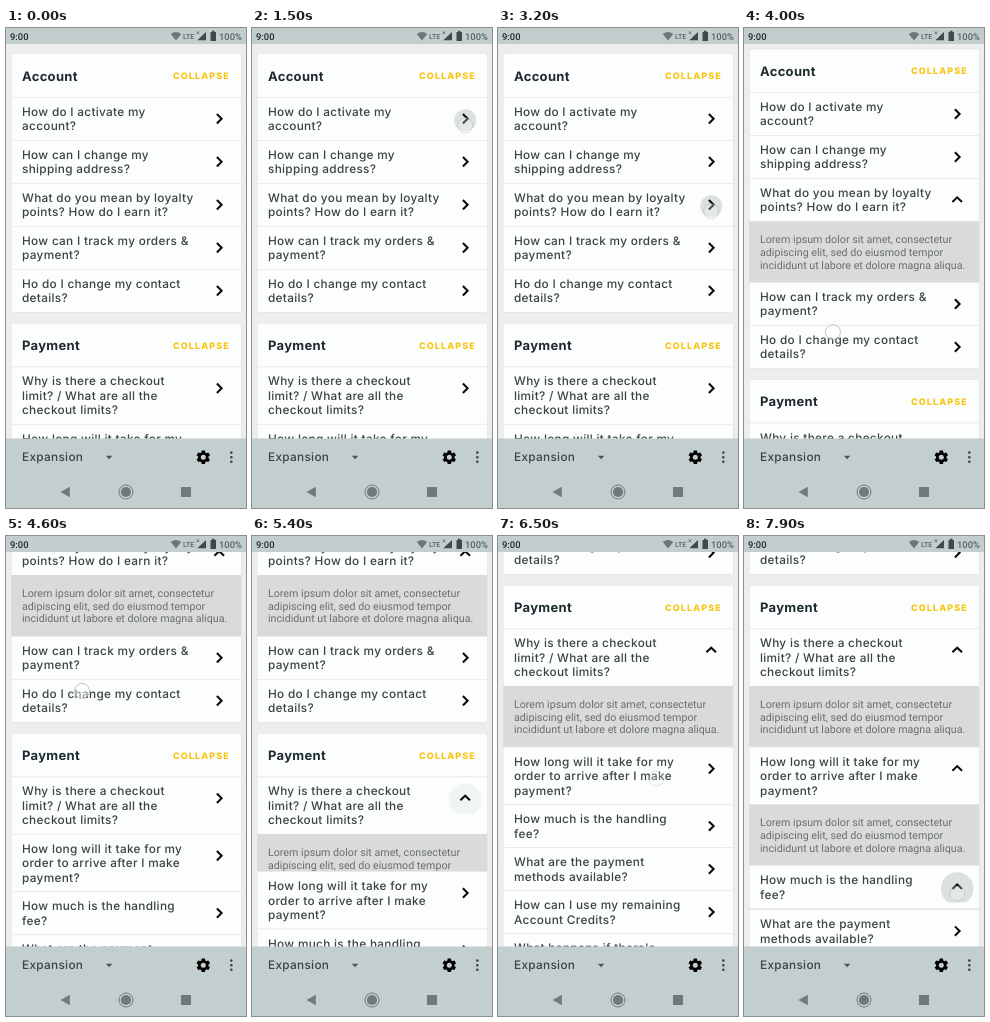
Animation of 240x480 px, one loop 8 s. Source, as an HTML page:

```html
<!DOCTYPE html>
<html lang="en">
<head>
<meta charset="utf-8">
<title>Expansion list</title>
<style>
  html, body { margin: 0; width: 100%; height: 100%; overflow: hidden; background: #ebeeec; }
  svg { display: block; width: 100vw; height: 100vh; }
  text { white-space: pre; text-rendering: geometricPrecision; }
  .title { font: 700 13px Inter, sans-serif; letter-spacing: .3px; fill: #1d2b30; }
  .action { font: 800 9px Inter, sans-serif; letter-spacing: 1.1px; fill: #f8c410; }
  .question { font: 500 11.8px Inter, sans-serif; letter-spacing: .31px; fill: #3a4244; }
  .answer { font: 400 10.7px Roboto, sans-serif; fill: #6a6e6d; }
  .status { font: 500 9.4px Roboto, sans-serif; fill: #566163; }
  .chevron { fill: none; stroke: #0c0e0e; stroke-width: 2.1; }
</style>
</head>
<body>
<svg id="stage" viewBox="0 0 240 480">
  <defs>
    <clipPath id="buttonClip"><rect x="-17" y="-17" width="34" height="32.5"/></clipPath>
  </defs>
  <rect width="240" height="480" fill="#ebeeec"/>
  <g id="list"></g>
  <circle id="finger" r="7.5" fill="#fff" fill-opacity=".45" stroke="#a9adac" stroke-opacity=".7"/>

  <g id="statusBar">
    <rect width="240" height="16" fill="#c2cdce"/>
    <text class="status" x="4" y="12" style="fill:#20282a">9:00</text>
    <path d="M164.8 6Q170 2.2 175.2 6L170 12.6Z" fill="#6b7779"/>
    <text class="status" x="177" y="11" style="font-size:7px">LTE</text>
    <path d="M191.3 12.3L200 4V12.3Z" fill="#3f4a4c"/>
    <path d="M190.6 3.4l2.6 2.8m0-2.8l-2.6 2.8" stroke="#566163" stroke-width=".8"/>
    <path d="M204.5 4h1.5v-1.2h2.5V4h1.5v9h-5.5z" fill="#3f4a4c"/>
    <text class="status" x="213" y="12">100%</text>
  </g>

  <g id="toolbar">
    <rect y="410.5" width="240" height="69.5" fill="#c3cecf"/>
    <text class="question" x="16" y="433.3">Expansion</text>
    <path d="M99.8 427.8h6.6l-3.3 3.5z" fill="#4c5658"/>
    <g id="gear" transform="translate(197.3 429.3)"></g>
    <g fill="#3c4547">
      <circle cx="225.3" cy="424.6" r="1.3"/><circle cx="225.3" cy="429.2" r="1.3"/><circle cx="225.3" cy="433.8" r="1.3"/>
    </g>
    <g fill="#6f7a7b">
      <path d="M54.5 464l9.3-5.3v10.6z"/>
      <circle cx="120" cy="464" r="5.1"/>
      <circle cx="120" cy="464" r="7" fill="none" stroke="#6f7a7b"/>
      <rect x="175" y="459" width="10" height="10"/>
    </g>
  </g>
</svg>
<script>
const LOOP = 8000, STEP = 100;
const LEFT = 5.5, WIDTH = 229.5, HEADER = 43, LINE = 14.4, PANEL = 61, GAP = 11.5;
const BUTTON_X = 213.2, BUTTON_Y = 21.8;
const ANSWER = [
  'Lorem ipsum dolor sit amet, consectetur',
  'adipiscing elit, sed do eiusmod tempor',
  'incididunt ut labore et dolore magna aliqua.'
];

// Each question: its lines, then the times at which it is tapped.
const CARDS = [
  ['Account', [
    [['How do I activate my', 'account?'], [1500, 2400]],
    [['How can I change my', 'shipping address?'], []],
    [['What do you mean by loyalty', 'points? How do I earn it?'], [3200]],
    [['How can I track my orders &', 'payment?'], []],
    [['Ho do I change my contact', 'details?'], []]
  ]],
  ['Payment', [
    [['Why is there a checkout', 'limit? / What are all the', 'checkout limits?'], [5100]],
    [['How long will it take for my', 'order to arrive after I make', 'payment?'], [6900]],
    [['How much is the handling', 'fee?'], [7800]],
    [['What are the payment', 'methods available?'], []],
    [['How can I use my remaining', 'Account Credits?'], []],
    [["What happens if there's", 'a problem with it?'], []]
  ]]
];

const DRAGS = [
  { start: 3930, end: 4600, lift: 4800, from: 0, to: 159, x: 76, y: 155, kx: .084, ky: .968 },
  { start: 5857, end: 6400, lift: 6600, from: 159, to: 307, x: 158.5, y: 242.5, kx: .152, ky: .86 }
];

const $ = id => document.getElementById(id);
const smooth = x => { x = Math.min(1, Math.max(0, x)); return x * x * (3 - 2 * x); };

function add(parent, tag, attrs = {}, text) {
  const node = document.createElementNS('http://www.w3.org/2000/svg', tag);
  for (const key in attrs) node.setAttribute(key, attrs[key]);
  if (text) node.textContent = text;
  return parent.appendChild(node);
}

function addLines(parent, cls, lines, y, pitch) {
  lines.forEach((line, i) => add(parent, 'text', { class: cls, x: 16, y: y + i * pitch }, line));
}

function moveTo(node, x, y) {
  node.setAttribute('transform', `translate(${x} ${y})`);
}

function buildRow(parent, [lines, taps]) {
  const height = lines.length > 2 ? 57.4 : 43;
  const group = add(parent, 'g');
  if (taps.length) {
    const panel = add(group, 'g', { transform: `translate(0 ${height})` });
    add(panel, 'rect', { x: LEFT, width: WIDTH, height: PANEL, fill: '#d9dbd9' });
    addLines(panel, 'answer', ANSWER, 22.2, 12.6);
  }
  add(group, 'rect', { x: LEFT, width: WIDTH, height, fill: '#fcfefd' });
  add(group, 'rect', { x: LEFT, width: WIDTH, height: .8, fill: '#e5e9e8' });
  addLines(group, 'question', lines, 18.9, LINE);
  const button = add(group, 'g', { 'clip-path': 'url(#buttonClip)' });
  moveTo(button, BUTTON_X, BUTTON_Y);
  const ripple = add(button, 'circle', { cy: 1.5, fill: '#d9dddc' });
  const chevron = add(button, 'path', { class: 'chevron' });
  return { group, height, taps, ripple, chevron };
}

function buildCard([title, questions]) {
  const group = add($('list'), 'g');
  const shadow = add(group, 'rect', { x: LEFT - .5, y: -.3, width: WIDTH + 1, rx: 1.5, fill: '#dde1e0' });
  add(group, 'rect', { x: LEFT, width: WIDTH, height: HEADER, rx: 1.5, fill: '#fcfefd' });
  add(group, 'text', { class: 'title', x: 16, y: 26.6 }, title);
  add(group, 'text', { class: 'action', x: 167, y: 25.2 }, 'COLLAPSE');
  return { group, shadow, rows: questions.map(q => buildRow(group, q)) };
}

// Updates one row; returns how far its panel is open (0 to 1) and whether it is pressed.
function updateRow(row, t) {
  const past = row.taps.filter(tap => tap <= t);
  const age = past.length ? t - past[past.length - 1] : Infinity;
  const count = age >= 100 ? past.length : past.length - 1;
  const isOpen = count > 0 && count % 2 === 1;
  row.chevron.setAttribute('d', isOpen ? 'M-4.8 2L0-2.6 4.8 2' : 'M-2.3-4.7L2.4 0-2.3 4.7');
  row.ripple.setAttribute('r', age < 100 ? 11 : 16.3);
  row.ripple.setAttribute('opacity', age < 200 ? .9 : Math.max(0, 1 - age / 450));
  const progress = smooth((age - 70) / 400);
  const open = past.length % 2 ? progress : past.length ? 1 - progress : 0;
  return { open, pressed: age < 200 };
}

function dragAt(t) {
  let scroll = 0, touch = null;
  for (const drag of DRAGS) {
    if (t < drag.start) break;
    scroll = drag.from + (drag.to - drag.from) * smooth((t - drag.start) / (drag.end - drag.start));
    const rest = drag.to - scroll;
    touch = t < drag.lift && {
      x: drag.x + rest * drag.kx,
      y: drag.y + rest * drag.ky,
      opacity: Math.min(1, (drag.lift - t) / 200)
    };
  }
  return { scroll, touch };
}

function render(t) {
  let { scroll, touch } = dragAt(t);
  let top = 26;
  for (const { group, shadow, rows } of cards) {
    moveTo(group, 0, top);
    let y = HEADER;
    for (const row of rows) {
      moveTo(row.group, 0, y);
      const { open, pressed } = updateRow(row, t);
      if (pressed) touch = { x: BUTTON_X, y: top + y + BUTTON_Y + 6.5 - scroll, opacity: .6 };
      y += row.height + PANEL * open;
    }
    shadow.setAttribute('height', y + .9);
    top += y + GAP;
  }
  moveTo($('list'), 0, -scroll);
  $('finger').setAttribute('opacity', touch ? touch.opacity : 0);
  if (touch) moveTo($('finger'), touch.x, touch.y);
}

for (let i = 0; i < 3; i++) {
  add($('gear'), 'rect', { x: -1.8, y: -6.8, width: 3.6, height: 13.6, rx: .5, transform: `rotate(${i * 60})` });
}
add($('gear'), 'circle', { r: 5.2 });
add($('gear'), 'circle', { r: 2.5, fill: '#c3cecf' });

const cards = CARDS.map(buildCard);
const origin = performance.now();
function tick() {
  const t = (performance.now() - origin) % LOOP;
  render(Math.floor(t / STEP) * STEP);
  requestAnimationFrame(tick);
}
tick();
</script>
</body>
</html>
```
